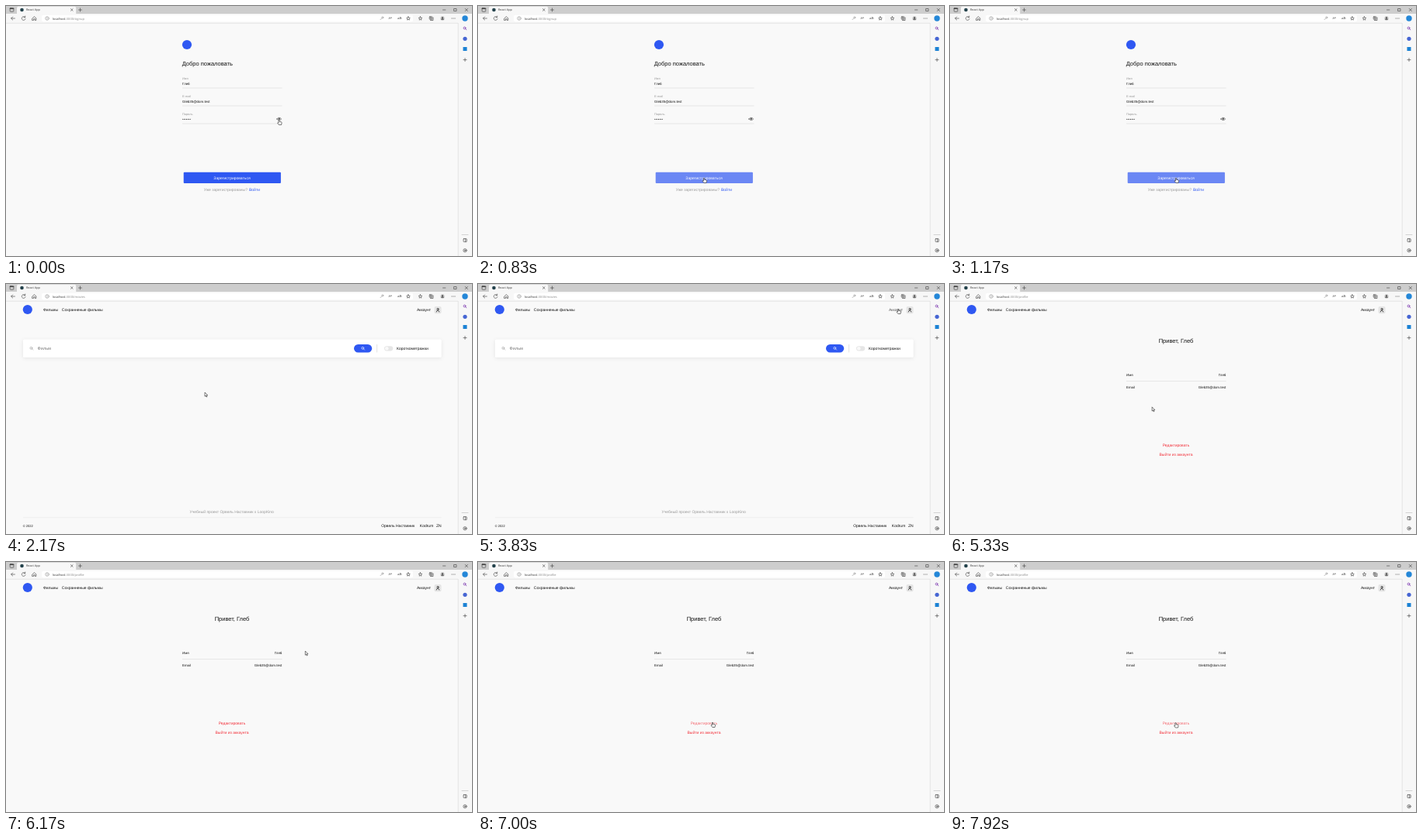
These frames come from a looping animation (600x323 px, 8000 ms). An HTML page:

```html
<!DOCTYPE html>
<html lang="ru">
<head>
<meta charset="utf-8">
<style>
  html, body { margin: 0; width: 100%; height: 100%; overflow: hidden; background: #f9f9f9; }
  svg { display: block; width: 600px; height: 323px; }
  text { font: 5px "Liberation Sans", Arial, sans-serif; fill: #111; text-rendering: geometricPrecision; white-space: pre; }
  .ui { font: 3.8px "Open Sans", sans-serif; fill: #333; }
  .url { font-size: 4px; }
  .title { font-size: 7.5px; }
  .small { font-size: 4.4px; }
  .label { font-size: 3.9px; fill: #999; }
  .grey { fill: #999; }
  .blue { fill: #2f58f2; }
  .red { fill: #f22b35; }
  .mid { text-anchor: middle; }
  .end { text-anchor: end; }
  .icon { fill: none; stroke: #444; stroke-width: .65; stroke-linecap: round; stroke-linejoin: round; }
  .pale { stroke: #999; }
  .rule { stroke: #dedede; stroke-width: .7; }
</style>
</head>
<body>
<svg viewBox="0 0 600 323">
  <defs>
    <filter id="shadow" x="-5%" y="-60%" width="110%" height="220%">
      <feDropShadow dx="0" dy="1" stdDeviation="2.5" flood-color="#000" flood-opacity=".09"/>
    </filter>
    <g id="lens"><circle r="1.4"/><path d="M1 1l1.3 1.3"/></g>
    <g id="star"><path d="M0-2.3L.7-.8 2.3-.6 1.1.5 1.4 2.1 0 1.3-1.4 2.1-1.1.5-2.3-.6-.7-.8z"/></g>
  </defs>

  <!-- Browser window -->
  <rect width="600" height="323" fill="#f9f9f9"/>
  <rect width="600" height="11" fill="#cdcdcd"/>
  <path d="M14 10.5V2.5Q14 .8 15.7.8H88.5Q90.2.8 90.2 2.5V10.5z" fill="#f7f7f7"/>
  <rect y="10" width="600" height="12" fill="#f7f7f7"/>
  <rect x="582" y="10" width="18" height="313" fill="#f7f7f7"/>
  <path d="M0 22.2H582M582.2 22V323" stroke="#dcdcdc" stroke-width=".7" fill="none"/>
  <rect x="46" y="11.7" width="478" height="8.6" rx="2" fill="#fff"/>
  <g class="icon">
    <rect x="5.2" y="2.7" width="4.6" height="4.6" rx=".8"/><path d="M5.2 3.3H9.8" stroke-width="1.2"/>
    <path d="M83.4 3.6l2.7 2.7m0-2.7l-2.7 2.7M93.5 5h4M95.5 3v4"/>
    <path d="M562.5 5h3.4M591.2 3.4l3.2 3.2m0-3.2l-3.2 3.2"/><rect x="577" y="3.5" width="3" height="3"/>
    <path d="M11.4 16H6.6l2-2m-2 2l2 2M24.6 14.5A2.4 2.4 0 1 0 25 16.7M24.7 13v1.7H23"/>
    <path d="M34 15.8l2.4-2.2 2.4 2.2v2.6h-1.6v-1.7h-1.6v1.7H34z"/>
    <g class="pale"><circle cx="53" cy="16" r="2.3"/><path d="M53 15.7v1.4M53 14.7v.1"/>
      <circle cx="484.8" cy="14.9" r="1.1"/><path d="M484 15.7l-2 2"/></g>
    <use href="#star" x="518" y="16"/><use href="#star" x="533.5" y="16"/>
    <rect x="545.2" y="13.7" width="3.7" height="3.7" rx=".7"/><path d="M546.5 18.5h3.5v-3.6M546 15.5h2M547 14.5v2"/>
    <path d="M574 16h.1M576 16h.1M578 16h.1" stroke-width=".9"/>
    <path d="M589 69.5h4M591 67.5v4"/><path d="M587 295.5h8" class="pale" stroke-width=".4"/>
    <rect x="589" y="300.7" width="4.2" height="4" rx=".6"/><path d="M591.7 300.7v4"/>
    <circle cx="591" cy="315.8" r="2.2"/><circle cx="591" cy="315.8" r=".7"/>
    <use href="#lens" x="590.5" y="28.5" style="stroke:#8546b5;stroke-width:.9"/>
  </g>
  <circle cx="562" cy="16" r="2.7" fill="#c7c7c7"/>
  <path d="M560.2 17.8a1.8 1.8 0 0 1 3.6 0z" fill="#555"/><circle cx="562" cy="15" r="1" fill="#555"/>
  <circle cx="20.5" cy="5" r="2.3" fill="#24424c"/>
  <circle cx="591" cy="16" r="3.7" fill="#2487d8"/>
  <circle cx="591" cy="42.3" r="2.6" fill="#4665d3"/>
  <rect x="588.5" y="53" width="5" height="5" fill="#1b82d4"/>
  <text class="ui" x="26" y="6.4">React App</text>
  <text class="ui" x="492.5" y="17.4">Aᴺ</text>
  <text class="ui" x="504" y="17.4">aあ</text>
  <text class="ui url" x="60" y="17.5">localhost<tspan fill="#888">:3000/<tspan id="route">signup</tspan></tspan></text>

  <!-- Registration -->
  <g id="signup">
    <circle cx="233" cy="50" r="6.1" class="blue"/>
    <text class="title" x="226.7" y="77">Добро пожаловать</text>
    <text class="label" x="227" y="95">Имя</text>
    <text class="small" x="227" y="102">Глеб</text>
    <text class="label" x="227" y="117.8">E-mail</text>
    <text class="small" x="227" y="124.8">Gleb35@dom.test</text>
    <text class="label" x="227" y="140.6">Пароль</text>
    <path d="M227.7 146.2h11" stroke="#222" stroke-width="1.15" stroke-linecap="round" stroke-dasharray="0 1.6"/>
    <path class="rule" d="M227 106H355.5M227 129H355.5M227 152H355.5"/>
    <path class="icon" d="M348.8 146Q351.7 142.4 354.6 146Q351.7 149.2 348.8 146z"/>
    <circle cx="351.7" cy="145.8" r="1.1" fill="#444"/>
    <rect id="button" x="228.7" y="214.7" width="125.2" height="14.2" rx="1" class="blue"/>
    <text class="mid" x="291" y="223.5" style="fill:#fff">Зарегистрироваться</text>
    <text class="grey" x="254.7" y="239">Уже зарегистрированы?</text>
    <text class="blue" x="313" y="239">Войти</text>
  </g>

  <!-- Signed-in header -->
  <g id="header">
    <circle cx="27.8" cy="33" r="6.1" class="blue"/>
    <text x="48" y="35.3">Фильмы</text>
    <text x="71.8" y="35.3">Сохранненые фильмы</text>
    <text id="account" class="end" x="547" y="35.3">Аккаунт</text>
    <rect x="551.5" y="29" width="9" height="9.3" rx="1.8" fill="#e5e5e5"/>
    <g class="icon" style="stroke:#111"><circle cx="556" cy="32.5" r="1.1"/><path d="M554.2 36a1.8 1.8 0 0 1 3.6 0"/></g>
  </g>

  <!-- Film search -->
  <g id="movies">
    <rect x="22" y="71.7" width="538.5" height="23" rx="1.5" fill="#fff" filter="url(#shadow)"/>
    <use href="#lens" class="icon pale" x="32.4" y="82.8"/>
    <text x="40.5" y="85.1" style="font-size:5.6px;fill:#777">Фильм</text>
    <rect x="448" y="78" width="23.2" height="10.6" rx="5.3" class="blue"/>
    <use href="#lens" class="icon" x="459.3" y="82.8" style="stroke:#fff"/>
    <path d="M477.6 78v10.4" stroke="#d5d5d5" stroke-width=".7"/>
    <rect x="487" y="80.2" width="11.3" height="6.2" rx="3.1" fill="#e6e6e6"/>
    <circle cx="490.2" cy="83.3" r="2.3" fill="#f9f9f9"/>
    <text x="503" y="84.9">Короткометражки</text>
    <text class="grey mid" x="290.7" y="295.8">Учебный проект Орвель Наставник х LoopKino</text>
    <path class="rule" d="M22 301.7H560.5" opacity=".5"/>
    <text x="21.7" y="313.5" style="font-size:4.06px">© 2022</text>
    <text class="end" x="526.3" y="313.8">Орвель Наставник</text>
    <text x="532.8" y="313.8">Kodrum</text>
    <text class="end" x="560.6" y="313.8">ZN</text>
  </g>

  <!-- Profile -->
  <g id="profile">
    <text class="title mid" x="291" y="75.7">Привет, Глеб</text>
    <text class="small" x="227" y="119.2">Имя</text>
    <text class="small end" x="355.3" y="119.2">Глеб</text>
    <path class="rule" d="M227 125.5H355.5"/>
    <text class="small" x="227" y="134.6">Email</text>
    <text class="small end" x="355.3" y="134.6">Gleb35@dom.test</text>
    <text id="edit" class="red mid" x="291" y="209.8">Редактировать</text>
    <text class="red mid" x="291" y="222.2">Выйти из аккаунта</text>
  </g>

  <g id="cursor" fill="#fff" stroke="#222" stroke-width=".6" stroke-linejoin="round">
    <path id="arrow" d="M0 0V5.2L1.2 4.1 2 6 2.9 5.6 2.1 3.8H3.7z"/>
    <path id="hand" d="M-.6.5Q0-.4.6.5V2.4L3 2.9Q3.7 3.1 3.6 3.9L3 6.5H-.2L-2 4.1Q-1.8 3.2-.6 4z"/>
  </g>
</svg>
<script>
  const LOOP = 8000, STEP = 1000 / 12;
  const MOVIES_AT = 1330, PROFILE_AT = 4000;
  const el = id => document.getElementById(id);

  // Pointer stops: time, x, y
  const path = [
    [0, 351.5, 147], [80, 351.5, 147], [670, 291, 222], [1250, 291, 222],
    [1670, 284, 174], [2080, 256, 140], [2250, 256, 140], [2580, 259, 92],
    [3330, 529, 45], [3670, 541, 32], [4080, 541, 32], [4500, 290, 51.5],
    [5000, 262, 145], [5400, 260, 160], [6080, 385.3, 115], [6250, 385.3, 115],
    [6670, 367, 171], [7000, 302, 207], [7170, 302, 207], [7500, 290.5, 207.5],
    [LOOP, 290.5, 207.5]
  ];

  function pointerAt(time) {
    const i = path.findIndex(stop => stop[0] > time);
    const [t0, x0, y0] = path[i - 1], [t1, x1, y1] = path[i];
    const p = (time - t0) / (t1 - t0), k = p * p * (3 - 2 * p);
    return [x0 + (x1 - x0) * k, y0 + (y1 - y0) * k];
  }

  const show = (id, on) => el(id).style.display = on ? "" : "none";
  const dim = (id, on) => el(id).style.opacity = on ? .7 : 1;

  function draw(now) {
    const time = Math.floor((now % LOOP + 5) / STEP) * STEP % LOOP;
    const page = time < MOVIES_AT ? "signup" : time < PROFILE_AT ? "movies" : "profile";
    const [x, y] = pointerAt(time);
    const over = (x0, y0, x1, y1) => x >= x0 && x <= x1 && y >= y0 && y <= y1;

    for (const id of ["signup", "movies", "profile"]) show(id, id === page);
    show("header", page !== "signup");
    el("route").textContent = page;

    const onEye = page === "signup" && over(348, 142, 355, 150);
    const onButton = page === "signup" && over(229, 215, 354, 229);
    const onAccount = page !== "signup" && over(528, 29, 561, 38);
    const onEdit = page === "profile" && over(273, 205, 309, 211);
    dim("button", onButton);
    dim("account", onAccount);
    dim("edit", onEdit);

    const pointing = onEye || onButton || onAccount || onEdit;
    show("hand", pointing);
    show("arrow", !pointing);
    el("cursor").setAttribute("transform", `translate(${x} ${y})`);
  }

  const start = performance.now();
  function tick() {
    draw(performance.now() - start);
    requestAnimationFrame(tick);
  }
  tick();
</script>
</body>
</html>
```
